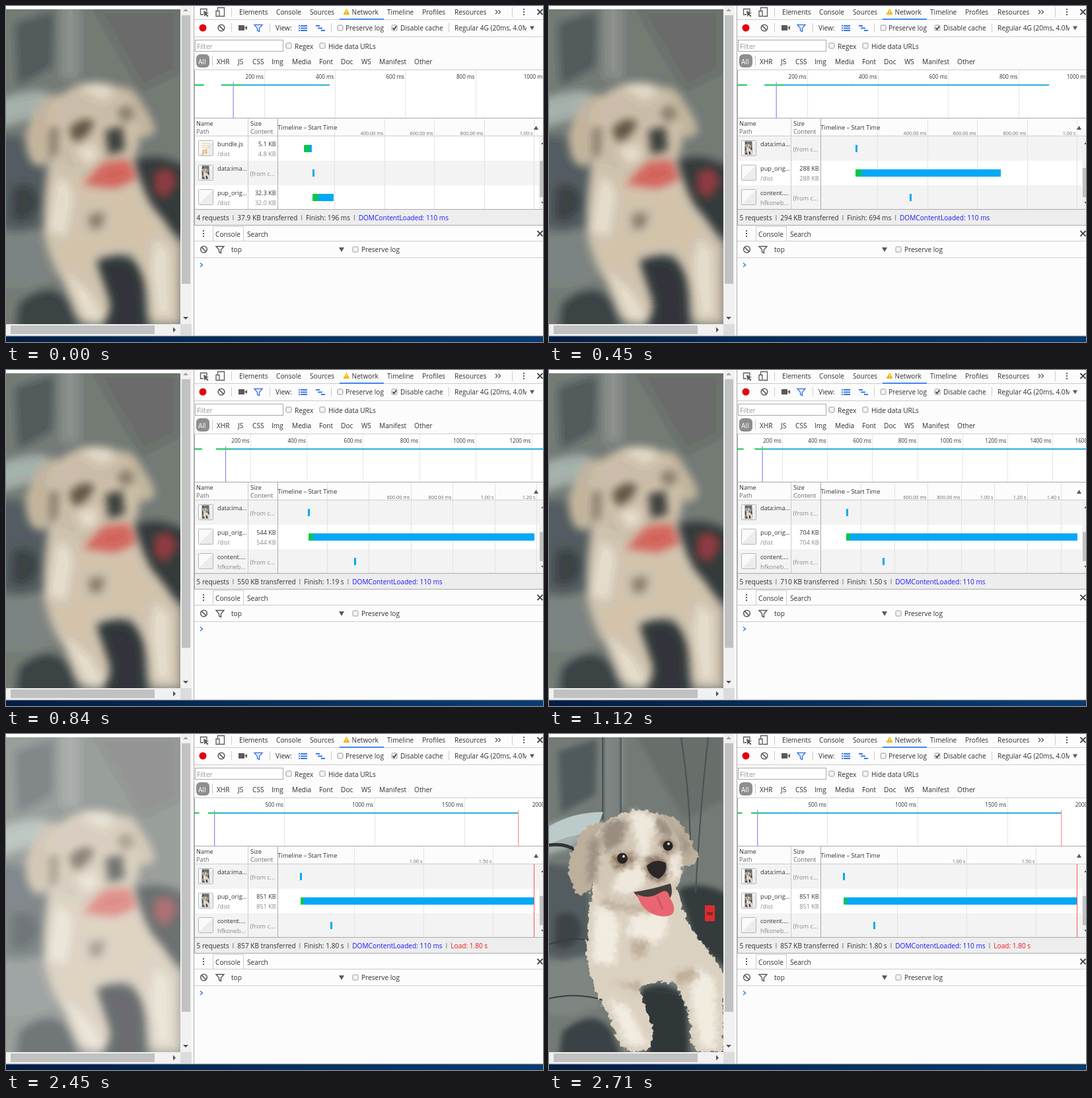
An HTML page that plays this animation: 813 by 508 pixels, repeating every 3720 ms.

```html
<!DOCTYPE html>
<html lang="en">
<head>
<meta charset="utf-8">
<title>Progressive image loading</title>
<style>
html, body { margin: 0; width: 100%; height: 100%; overflow: hidden; background: #fff; }
#stage { display: block; width: 813px; height: 508px; font: 10.15px "Open Sans", "Noto Sans", sans-serif; fill: #303030; }
#stage text { white-space: pre; }
</style>
</head>
<body>
<svg id="stage" viewBox="0 0 813 508">
  <defs>
    <linearGradient id="pillar">
      <stop offset="0" stop-color="#454c4e"/><stop offset=".2" stop-color="#7f8683"/>
      <stop offset=".85" stop-color="#7a817e"/><stop offset="1" stop-color="#4b5254"/>
    </linearGradient>
    <linearGradient id="taskbar">
      <stop offset="0" stop-color="#031d42"/><stop offset=".6" stop-color="#043263"/><stop offset="1" stop-color="#073c74"/>
    </linearGradient>
    <linearGradient id="paper" x2="1" y2="1">
      <stop offset=".5" stop-color="#fafafa"/><stop offset=".5" stop-color="#ececec"/>
    </linearGradient>
    <filter id="soft" x="-10%" y="-10%" width="120%" height="120%" color-interpolation-filters="sRGB">
      <feGaussianBlur stdDeviation="6.5"/>
      <feComponentTransfer>
        <feFuncR type="discrete"/><feFuncG type="discrete"/><feFuncB type="discrete"/>
      </feComponentTransfer>
    </filter>
    <filter id="fuzz" x="-20%" y="-20%" width="140%" height="140%" color-interpolation-filters="sRGB"><feGaussianBlur stdDeviation="4"/></filter>
    <filter id="fur" x="-5%" y="-5%" width="110%" height="110%" color-interpolation-filters="sRGB">
      <feTurbulence type="fractalNoise" baseFrequency=".13" numOctaves="2" seed="4"/>
      <feDisplacementMap in="SourceGraphic" scale="11" xChannelSelector="R" yChannelSelector="G"/>
    </filter>
    <path id="body" d="M68 222Q54 290 58 345Q66 388 88 420L104 464Q116 483 140 481Q160 474 157 446L136 384Q165 372 190 376Q212 410 214 446Q212 474 226 481H264V362Q240 322 222 304Q204 275 194 232Z"/>
    <path id="head" d="M76 142Q100 116 135 115Q172 114 187 142Q204 176 201 210Q194 244 166 254Q118 262 84 245Q60 228 62 186Q64 160 76 142Z"/>
    <path id="ears" d="M80 133Q48 135 39 171Q22 197 36 232Q51 252 64 234Q76 200 84 158ZM172 122Q196 122 204 145Q222 168 226 188Q215 205 200 196Q190 168 172 122Z"/>

    <g id="tones">
      <path fill="#747b77" d="M-30-30H300V520H-30Z"/>
      <path fill="#505a5d" d="M14 26L72 8L70 92L18 120Z"/>
      <path fill="#8a908b" d="M82-20H112V110H82Z"/>
      <path fill="#686f6b" d="M130 0H264V100L205 130Z"/>
      <path fill="#a4b0ab" d="M-20 145Q35 122 66 130L40 170L-20 188Z"/>
      <path fill="#535d60" d="M-20 195L35 200L60 245L66 330L30 345L-20 330Z"/>
      <path fill="#3c4447" d="M10 275Q45 258 50 300Q35 335 8 320Z"/>
      <path fill="#7f8581" d="M-20 350L55 335L80 410L40 425H-20Z"/>
      <path fill="#3a4245" d="M20 450Q70 410 95 450L110 490H15Z"/>
      <path fill="#343b3c" d="M195 235Q230 218 275 245V360L222 318Z"/>
      <path fill="#303739" d="M136 388Q180 365 208 402L213 495H152Z"/>
    </g>

    <g id="photo">
      <use href="#tones" filter="url(#fuzz)"/>
      <path fill="url(#pillar)" d="M80 5H110V130H80Z"/>
      <path fill="none" stroke="#4a5153" stroke-width="2" d="M200 5Q212 80 214 160M241 5Q229 110 222 240"/>
      <path fill="#bccaca" d="M0 140Q35 118 82 118L70 150Q35 150 0 167Z"/>
      <path fill="none" stroke="#2f3537" stroke-width="5" d="M0 168Q45 162 60 204"/>
      <path fill="none" stroke="#383f41" stroke-width="2" d="M0 318Q35 306 60 312M0 400Q40 390 82 402M136 392Q165 385 200 396"/>
      <path fill="#dc2c31" d="M236 259H251V283H236Z"/>
      <path fill="#8b2427" d="M239 269H248V274H239Z"/>
      <g filter="url(#fur)">
        <use href="#body" fill="#dbd1c1"/>
        <g filter="url(#fuzz)">
          <path fill="#f1ebe0" d="M70 262Q95 255 106 290L100 350L66 345ZM125 275L175 268Q190 300 160 318L118 305ZM90 400L120 412L150 470H118ZM224 350L252 372L254 474H230L214 395Z"/>
          <path fill="#bfae99" d="M190 362Q225 345 226 368Q210 372 196 382ZM92 372Q125 382 140 372L138 392ZM124 312L150 310L146 335L128 338ZM80 246Q120 266 180 254L160 268Q110 272 80 258Z"/>
        </g>
        <use href="#ears" fill="#bdb09d"/>
        <use href="#head" fill="#d3c8b7"/>
        <g filter="url(#fuzz)">
          <path fill="#eee8dc" d="M122 117Q150 117 160 130L150 185L138 186ZM108 206L142 196L148 224L122 244L92 238ZM180 188L198 180V214L182 226Z"/>
          <path fill="#988d7f" d="M78 144Q98 122 118 132L112 164L86 180ZM163 123Q184 132 190 158L166 150ZM62 160L78 155L70 222L58 225ZM196 140L214 172L206 186Z"/>
          <path fill="#8d7561" d="M94 186Q112 170 130 188Q120 206 100 204ZM166 163Q184 150 194 172L178 182ZM146 190L160 182L178 190L182 216L168 224L148 216Z"/>
        </g>
      </g>
      <path fill="#433d3b" d="M128 239Q152 236 184 226Q190 246 178 252L142 255Z"/>
      <path fill="#e86671" d="M133 242Q150 251 168 240Q180 232 183 248Q194 264 186 273Q174 279 157 272Q139 264 133 242Z"/>
      <path fill="none" stroke="#c94c5a" stroke-width="2" d="M164 246L172 265"/>
      <circle cx="111" cy="188" r="8" fill="#272322"/><circle cx="180" cy="169" r="7.5" fill="#272322"/>
      <circle cx="113" cy="185" r="2" fill="#ddd"/><circle cx="181" cy="166" r="2" fill="#ddd"/>
      <path fill="#2b2727" d="M148 199Q162 187 177 195Q180 210 166 219Q150 214 148 199Z"/>
    </g>

    <g id="placeholder" filter="url(#soft)">
      <use href="#tones"/>
      <path fill="#8f3f40" d="M225 250L248 245L260 265L242 292L224 280Z"/>
      <use href="#body" fill="#d0c3af"/>
      <use href="#ears" fill="#c4b69f"/>
      <use href="#head" fill="#cdbfa9"/>
      <path fill="#e4dccb" d="M76 265Q95 250 102 290L92 350L62 340ZM88 400L125 430L152 475H120ZM225 350L248 370L250 470H228L218 395ZM105 215L136 208L140 232L118 240ZM110 122Q150 115 166 130L145 142Z"/>
      <path fill="#625647" d="M95 188Q110 165 134 174Q126 200 104 206Z"/>
      <path fill="#8a7e6c" d="M166 160L184 148L196 165L180 178ZM65 185L80 182L78 225L66 230ZM125 315L150 312L145 335L128 338Z"/>
      <path fill="#3f423f" d="M150 188L176 182L180 218L155 225Z"/>
      <path fill="#d5675f" d="M116 270L148 236L186 232L198 262L165 276Z"/>
    </g>
  </defs>
  <g id="chrome"></g>
  <svg y="5" width="264" height="476" viewBox="0 5 264 476">
    <use id="low" href="#placeholder"/>
    <use id="full" href="#photo"/>
  </svg>
  <g id="live"></g>
</svg>
<script>
const $ = id => document.getElementById(id);
const DARK = '#303030', GREY = '#888', LINE = '#ccc', ICON = '#5a5a5a', BLUE = '#03a9f4', GREEN = '#0cc553';

const text = (x, y, s, size = 10.15, fill = DARK, extra = '') =>
  `<text x="${x}" y="${y}" font-size="${size}" fill="${fill}" ${extra}>${s}</text>`;
const rect = (x, y, w, h, fill, extra = '') =>
  `<rect x="${x}" y="${y}" width="${w}" height="${h}" fill="${fill}" ${extra}/>`;
const fillPath = (d, fill = ICON) => `<path d="${d}" fill="${fill}"/>`;
const stroke = (d, color = LINE, w = 1) => `<path d="${d}" fill="none" stroke="${color}" stroke-width="${w}"/>`;
const words = (y, list) => list.map(([x, s]) => text(x, y, s)).join('');
const checkbox = (x, y, on) => rect(x - 4, y - 4, 8, 8, '#f4f4f4', 'rx="1.5" stroke="#999"') +
  (on ? stroke(`M${x - 2.5} ${y}l2 2.5 3.5 -5`, '#333', 1.5) : '');
const clearIcon = (x, y) => `<circle cx="${x}" cy="${y}" r="4.8" fill="none" stroke="${ICON}" stroke-width="1.6"/>` +
  stroke(`M${x - 3.4} ${y - 3.4}l6.8 6.8`, ICON, 1.6);
const funnel = (x, y, color) => stroke(`M${x - 6} ${y - 4.5}h12l-4.5 5v5l-3 -1.5v-3.5z`, color, 1.4);
const dots = (x, y) => [-4, 0, 4].map(d => rect(x - 1, y + d - 1, 2, 2, ICON)).join('');
const cross = y => stroke(`M804.5 ${y - 4}l8 8m0 -8l-8 8`, '#444', 1.8);

function drawChrome() {
  const leftPane = rect(264, 0, 17, 498, '#f1f1f1') + rect(0, 481, 264, 17, '#f1f1f1') +
    rect(266, 14, 13, 406, '#c1c1c1') + rect(7, 483, 218, 13, '#c1c1c1') + rect(264, 481, 17, 17, '#dcdcdc') +
    fillPath('M268 8l4-4 4 4z', '#a3a3a3') + fillPath('M268 470h8l-4 4z', '#505050') + fillPath('M253 485.500v8l4-4z', '#505050');

  const panels = rect(285, 0, 528, 498, '#fcfcfc') + rect(285, 97, 528, 73, '#fff') +
    rect(285, 308, 528, 23, '#ededed') +
    stroke('M284.500 0V498', '#a8a8a8') +
    stroke('M285 20.500H813M285 46.500H813M285 96.500H813M285 355.500H813M285 380.500H813') +
    stroke('M285 169.500H813M285 307.500H813M285 331.500H813M285.500 97V331', '#aaa') +
    rect(0, 498, 813, 1, '#c4c7ca') + rect(0, 499, 813, 1, '#4a5b70') + rect(0, 500, 813, 8, 'url(#taskbar)');

  const tabs = stroke('M304 9V4.500H294.500V13H299', ICON, 1.3) + fillPath('M299 7l8 4-3.500 1 3 3-1.500 1.500-3-3-1.500 3z') +
    stroke('M320.500 7V2.500H330.500V15.500H324M318 7.500h5v8h-5z', ICON, 1.3) +
    stroke('M341.500 3V16M766.500 2V17') +
    words(13, [[353, 'Elements'], [409, 'Console'], [460, 'Sources'], [523.5, 'Network'], [577, 'Timeline'], [630, 'Profiles'], [679, 'Resources']]) +
    fillPath('M515.500 4l5 9h-10z', '#f4b400') + rect(515, 7, 1, 3, '#fff') + rect(515, 11, 1, 1, '#fff') +
    rect(505, 19, 67, 2, '#4285f4') + stroke('M741 6l3 3-3 3m4.500-6l3 3-3 3', ICON, 1.3) + dots(784, 9) + cross(9);

  const toolbar = '<circle cx="298" cy="33" r="5.5" fill="#e1000f"/>' + clearIcon(326, 33) +
    rect(352, 29, 9, 8, ICON) + fillPath('M361 33l4-3v6z') + funnel(382, 33, '#3b78e7') +
    stroke('M341.500 26V40M399.500 26V40M492.500 26V40M670.500 26V40') +
    [29, 32.5, 36].map(y => rect(443, y, 2, 2, '#3b78e7') + rect(446, y, 10, 2, '#3b78e7')).join('') +
    rect(469, 29, 6, 2, '#3b78e7') + rect(472, 32.5, 7, 2, '#3b78e7') + rect(477, 36, 6, 2, '#3b78e7') +
    words(37, [[408, 'View:'], [514, 'Preserve log'], [597, 'Disable cache']]) +
    checkbox(506, 33) + checkbox(588, 33, true) +
    `<svg width="788" height="46">${text(679, 37, 'Regular 4G (20ms, 4.0Mb/s)')}</svg>` + fillPath('M793 30.500h7l-3.500 6z');

  const filters = rect(286.5, 51.5, 133, 17, '#fff', 'stroke="#a9a9a9"') + text(289, 65, 'Filter', 10.15, '#999') +
    checkbox(428, 60) + checkbox(479, 60) + words(65, [[437, 'Regex'], [488, 'Hide data URLs']]) +
    rect(288, 73, 20, 20, '#8e8e8e', 'rx="6"') + text(291, 88, 'All', 10.15, '#fff') + stroke('M312.500 75V91') +
    words(88, [[319, 'XHR'], [351, 'JS'], [373, 'CSS'], [402, 'Img'], [433, 'Media'], [474, 'Font'], [507, 'Doc'], [538, 'WS'], [565, 'Manifest'], [618, 'Other']]);

  const drawer = dots(299, 344) + rect(313.5, 333.5, 46, 22, '#fff', `stroke="${LINE}"`) +
    words(349, [[317, 'Console'], [365, 'Search']]) + cross(344) +
    clearIcon(299.5, 368) + funnel(324, 368, ICON) + words(372, [[341, 'top'], [538, 'Preserve log']]) +
    fillPath('M504 365h8l-4 7z') + checkbox(529, 368) + stroke('M294 388.500l3.500 3-3.500 3', '#3b78e7', 1.5);

  $('chrome').innerHTML = rect(0, 0, 813, 508, '#fff') + leftPane + panels + tabs + toolbar + filters + drawer;
}

// start ms, KB received, finish ms, end of the overview bar, overview span
const steps = [
  [0, 32, 196, 385, 992],
  [150, 128, 385, 573, 992],
  [300, 224, 571, 761, 992],
  [450, 288, 694, 887, 992],
  [570, 352, 818, 1010, 1240],
  [720, 448, 1004, 1195, 1240],
  [840, 544, 1190, 1380, 1240],
  [970, 608, 1314, 1510, 1550],
  [1120, 704, 1500, 1690, 1550],
  [1270, 784, 1655, 1790, 1937],
  [1390, 845, 1785, 1800, 1937],
  [1550, 851, 1800, 1800, 1937],
];

const gridStep = (scale, minGap) => scale * 1000 >= 5 * minGap ? 200 : 500;

function overview(end, span, loaded) {
  const scale = 528 / span, x = ms => 285 + ms * scale, step = gridStep(scale, 64);
  const bar = (a, b, color) => rect(x(a), 118.5, x(b) - x(a), 2, color);
  let out = '';
  for (let ms = step; ms <= span + step; ms += step) {
    out += stroke(`M${Math.round(x(ms)) + .5} 97V169`, '#e4e4e4') +
      text(x(ms) - 1.5, 110, ms + ' ms', 8.1, DARK, 'text-anchor="end"');
  }
  out += bar(0, 28, GREEN) + bar(77, 136, GREEN) + bar(136, end, '#1ba6e0') + rect(x(328), 116, 1, 1, '#9ccbe6');
  out += rect(x(110), 115, 1.3, 54, '#9090f2');
  if (loaded) out += rect(x(1800) - .5, 115, 1.3, 54, '#f99');
  return out;
}

function pageIcon(y, kind) {
  const art = {
    script: [4, 7, 10].map(d => rect(296, y + d, 13, 1, '#f3c88a')).join('') +
      text(297, y + 19.5, 'JS', 9, '#f29a2e', 'font-weight="700"'),
    image: `<use href="#photo" transform="translate(296.500 ${y + 1.3}) scale(.042)"/>`,
  };
  const clip = `<svg x="292" y="${y + 1}" width="21" height="22" viewBox="292 ${y + 1} 21 22">${art[kind] || ''}</svg>`;
  const photoClip = `<svg x="296.5" y="${y + 1.5}" width="11.1" height="20" viewBox="296.5 ${y + 1.5} 11.1 20">${art.image}</svg>`;
  return rect(291.5, y + .5, 22, 23, 'url(#paper)', 'rx="1" stroke="#b5b5b5"') + (kind === 'image' ? photoClip : clip);
}

function table(kb, finish, scrolled, complete) {
  const scale = 378 / Math.max(1002, finish), step = gridStep(scale, 48);
  const x = ms => Math.round(422 + ms * scale);
  const tick = (y, ms, w = 3) => rect(x(ms), y + 13, w, 11, BLUE);
  const size = kb + ' KB';
  const rows = [
    { name: 'bundle.js', path: '/dist', size: '5.1 KB', raw: '4.8 KB', icon: 'script',
      bar: y => rect(x(77), y + 13, 10, 11, GREEN, 'rx="1.5"') + tick(y, 101) },
    { name: 'data:ima...', cached: true, icon: 'image', bar: y => tick(y, 111) },
    { name: 'pup_orig...', path: '/dist', size: scrolled ? size : '32.3 KB', raw: scrolled ? size : '32.0 KB',
      icon: complete && 'image',
      bar: y => rect(x(136), y + 13, x(finish) - x(136), 11, BLUE) +
        rect(x(112), y + 13, x(136) - x(112), 11, GREEN, 'rx="1"') },
    { name: 'content....', path: 'hfkoneb...', cached: true, bar: y => tick(y, 329) },
  ];
  const first = scrolled ? 1 : 0, shown = rows.slice(first, first + 3);
  const top = i => 197 + 37 * i;
  let out = rect(286, 170, 527, 27, '#fcfcfc');

  shown.forEach((row, i) => { out += rect(286, top(i), 521, i < 2 ? 37 : 36, (i + first) % 2 ? '#f3f3f3' : '#fff'); });
  for (let ms = step; x(ms) < 806; ms += step) {
    out += stroke(`M${x(ms) + .5} 170V307`, '#e2e2e2');
    const label = ms < 1000 ? ms + '.00 ms' : (ms / 1000).toFixed(2) + ' s';
    if (x(ms) > 560) out += text(x(ms) - 1.5, 195, label, 7.3, '#666', 'text-anchor="end"');
  }
  out += stroke('M286 196.500H813M366.500 170V307') + stroke('M411.500 170V307', '#aaa') +
    text(288, 181, 'Name', 9.2) + text(288, 193, 'Path', 9.2, '#666') +
    text(370, 181, 'Size', 9.2) + text(370, 193, 'Content', 9.2, '#666') +
    text(411.5, 187, 'Timeline – Start Time', 9.2) + fillPath('M799 187h7l-3.500-6z');

  shown.forEach((row, i) => {
    const y = top(i), right = 'text-anchor="end"';
    out += pageIcon(y + 6, row.icon) + text(320, y + 15, row.name, 9.2) + text(320, y + 30, row.path || '', 9.2, GREY);
    out += row.cached ? text(369.5, y + 22.5, '(from c...', 9.2, GREY)
      : text(408.5, y + 15, row.size, 9, DARK, right) + text(408.5, y + 30, row.raw, 9, GREY, right);
    out += row.bar(y);
  });
  if (complete) out += stroke('M799.500 197V307', '#f55');

  const thumb = scrolled ? 245 : 234;
  return out + rect(807, 197, 6, 110, '#f1f1f1') + rect(808, thumb, 5, 289 - thumb, '#c1c1c1') +
    fillPath('M810 209l4-4v4z', '#505050') + fillPath('M810 296h4v4z', '#505050');
}

function status(kb, finish, scrolled, complete) {
  const time = finish < 1000 ? finish + ' ms' : (finish / 1000).toFixed(2) + ' s';
  const parts = [
    [scrolled ? '5 requests' : '4 requests', DARK],
    [(scrolled ? kb + 6 : 37.9) + ' KB transferred', DARK],
    ['Finish: ' + time, DARK],
    ['DOMContentLoaded: 110 ms', '#1a1aff'],
  ];
  if (complete) parts.push(['Load: 1.80 s', '#f0141e']);
  const spans = parts.map(([s, color], i) =>
    (i ? '<tspan dx="4.9" fill="#666">I</tspan>' : '') + `<tspan dx="${i ? 4.9 : 0}" fill="${color}">${s}</tspan>`);
  return text(288.5, 324, spans.join(''), 10.1);
}

let shownStep = -1;
function draw(t) {
  const index = steps.findLastIndex(s => t >= s[0]);
  if (index !== shownStep) {
    shownStep = index;
    const [start, kb, finish, end, span] = steps[index];
    const scrolled = start >= 150, complete = start >= 1550;
    $('live').innerHTML = overview(end, span, start >= 1390) +
      table(kb, finish, scrolled, complete) + status(kb, finish, scrolled, complete);
  }
  $('low').setAttribute('opacity', t < 2450 ? 1 : t < 2590 ? .72 : 0);
  $('full').setAttribute('opacity', t < 2590 ? 0 : t < 2710 ? .55 : 1);
}

const LOOP = 3720, LEVELS = 32;
const bands = Array.from({ length: LEVELS }, (_, i) => (i + .5) / LEVELS).join(' ');
document.querySelectorAll('#soft [type=discrete]').forEach(f => f.setAttribute('tableValues', bands));
drawChrome();
const began = performance.now();
function frame() {
  draw((performance.now() - began) % LOOP);
  requestAnimationFrame(frame);
}
frame();
</script>
</body>
</html>
```
